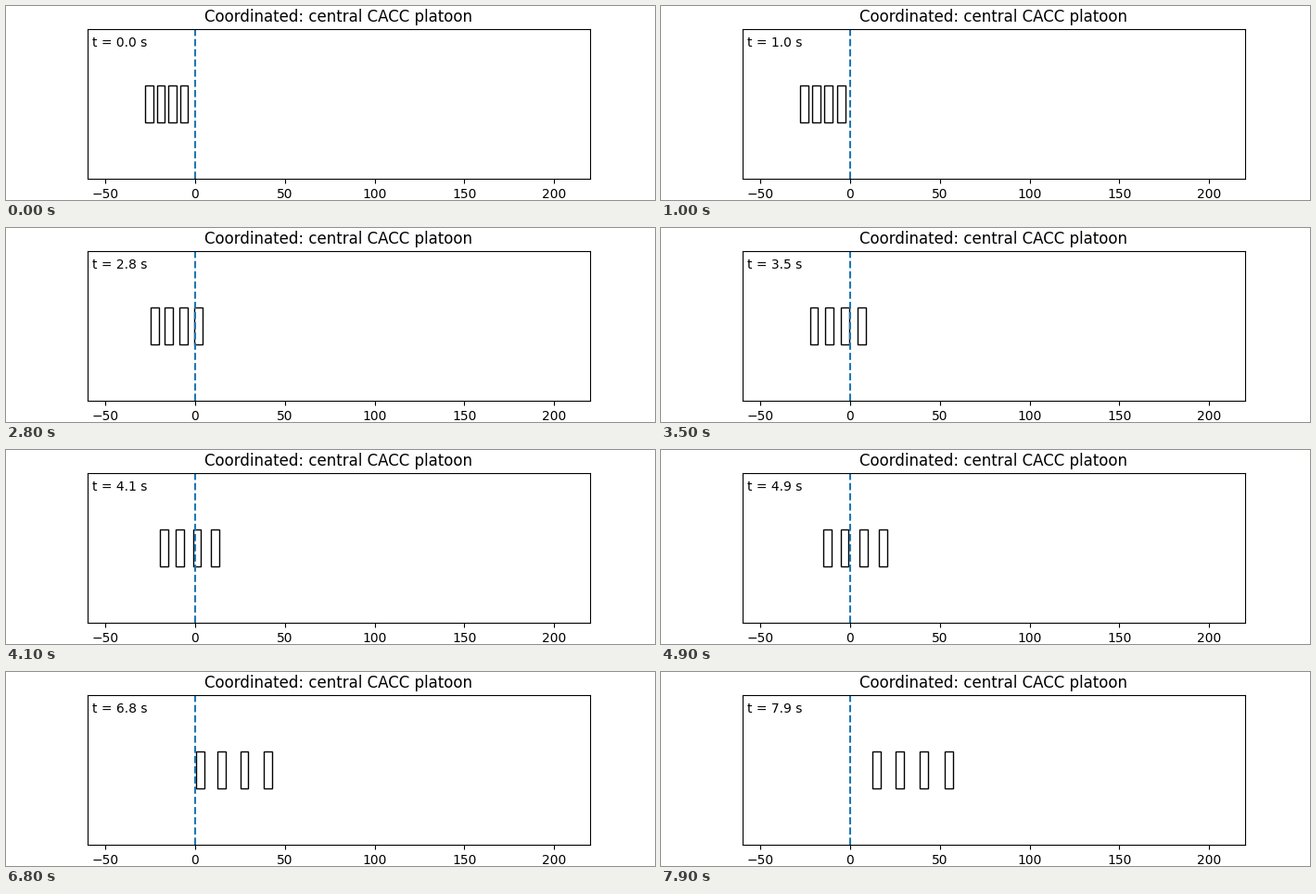
Animation of 700 by 210 pixels, one loop 8000 ms. Source, as a matplotlib script:

```python
import numpy as np
import matplotlib.pyplot as plt
from matplotlib.animation import FuncAnimation
from matplotlib.patches import Rectangle

DT = 0.1            # s per step
STEPS = 80
CARS = 4
LENGTH = 4.5        # m
SPACING = 6.5       # m, centre to centre at standstill
START = -6.0        # centre of the leading car
ACCEL, V_MAX = 2.0, 13.0
HEADWAY = 0.61      # s
GAIN = 0.776        # response to the speed difference
FEED = 1 - HEADWAY * GAIN   # share of the predecessor's acceleration


def simulate():
    """Car centres at every step, leader first."""
    pos = START - SPACING * np.arange(CARS)
    vel = np.zeros(CARS)
    track = [pos.copy()]
    for _ in range(STEPS - 1):
        acc = np.zeros(CARS)
        acc[0] = min(ACCEL, (V_MAX - vel[0]) / DT)
        for i in range(1, CARS):
            acc[i] = FEED * acc[i - 1] + GAIN * (vel[i - 1] - vel[i])
        vel += acc * DT
        pos += vel * DT
        track.append(pos.copy())
    return np.array(track)


track = simulate()

fig, ax = plt.subplots(figsize=(7, 2.1), dpi=100)
ax.set_xlim(-60, 220)
ax.set_ylim(-2, 2)
ax.set_yticks([])
ax.set_title("Coordinated: central CACC platoon")
ax.axvline(0, linestyle="--")
clock = ax.text(0.01, 0.95, "", transform=ax.transAxes, va="top")
cars = [ax.add_patch(Rectangle((0, -0.5), LENGTH, 1, fill=False))
        for _ in range(CARS)]


def update(step):
    for car, x in zip(cars, track[step]):
        car.set_x(x - LENGTH / 2)
    clock.set_text(f"t = {step * DT:.1f} s")
    return [*cars, clock]


anim = FuncAnimation(fig, update, frames=STEPS, interval=100,
                     repeat=True, repeat_delay=0, blit=False)
plt.show()
```
